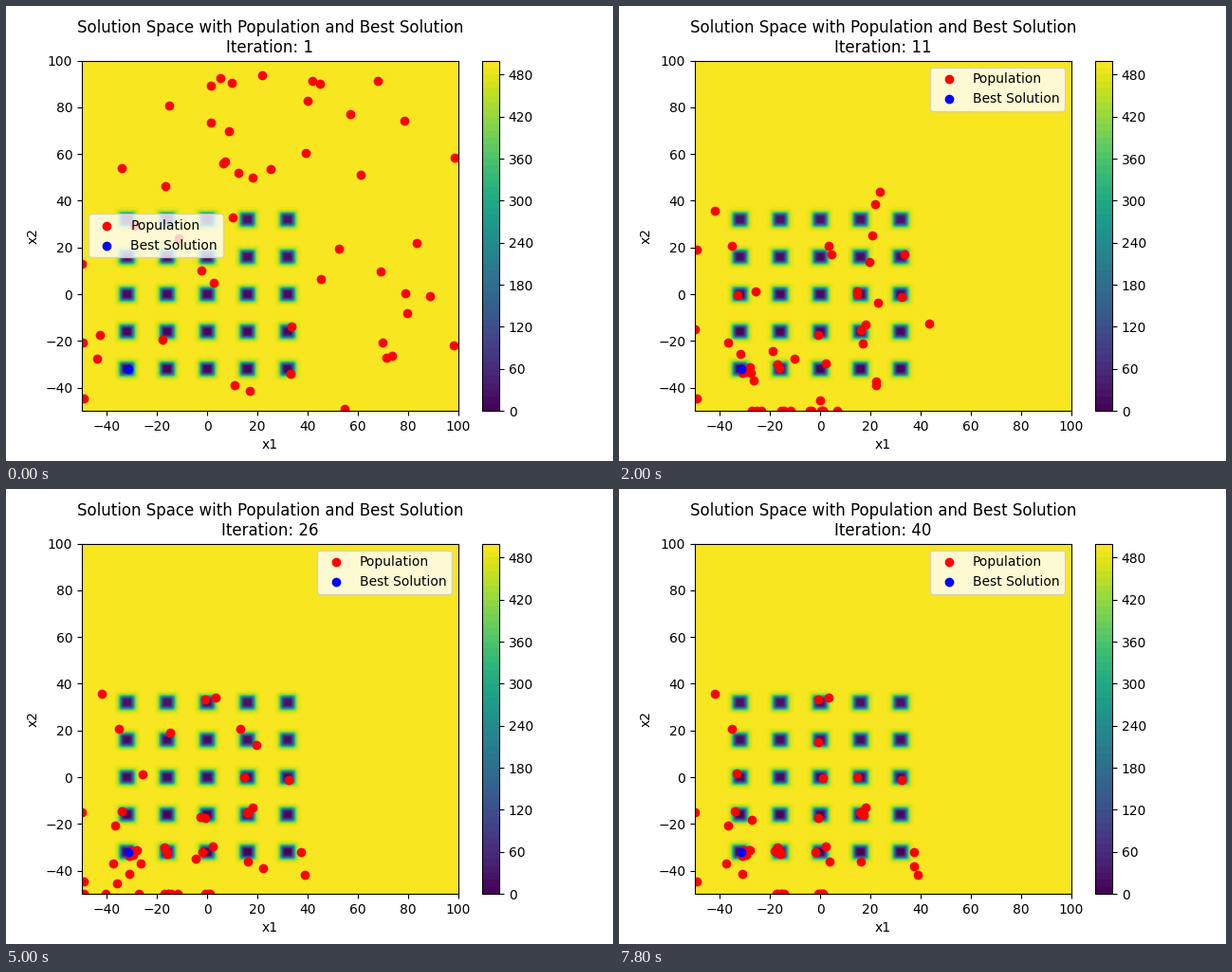
A matplotlib script that plays this animation: 640x480 px, repeating every 8000 ms.

```python
import numpy as np
import matplotlib.pyplot as plt
from matplotlib.animation import FuncAnimation

LOW, HIGH = -50, 100
SPAN = HIGH - LOW
SIZE, STEPS = 50, 40
HOP_EVERY, HOP_UNTIL = 7, 15

# Lone resting places, in order of arrival
LONERS = [
    (-49.2, -44.6), (-42.1, 35.7), (-0.9, -17.5), (14.6, 0), (-36.8, -20.7),
    (32.4, -1.2), (2.2, -29.6), (-28.1, -31.2), (-35.3, 20.7), (-50, -15),
    (-37.5, -36.9), (-0.9, 33.3), (3.3, 34.1), (-2, -32.1), (16.2, -36.1),
    (37.3, -32.1), (38.8, -41.8), (-34.1, -14.6), (-31.1, -41.4), (-0.9, 15),
    (-27.3, -18.3), (1, -0.4), (37.3, -38.1), (3.7, -36.1), (-33.4, 1.6)]
# Clusters; those below the lower bound end up lined along it
CLUSTERS = [(-30, -32), (-16, -32), (-16, -54), (1, -54), (17, -15)]


def foxholes(x, y):
    """Plateau at 500 with a 5 by 5 grid of steep holes."""
    pits = np.arange(-32, 33, 16)
    total = 0.002
    for j in range(25):
        a, b = pits[j % 5], pits[j // 5]
        total = total + 1 / (j + 1 + (x - a) ** 6 + (y - b) ** 6)
    return 1 / total


def make_homes(rng):
    """Alternate lone places with scattered cluster members."""
    homes = np.empty((SIZE, 2))
    homes[::2] = LONERS
    grouped = np.tile(CLUSTERS, (SIZE // 2 // len(CLUSTERS), 1))
    homes[1::2] = grouped + rng.normal(0, 1.2, grouped.shape)
    return np.maximum(homes, LOW)


def search(rng):
    """Positions per iteration: hop in a shrinking region, then settle."""
    homes = make_homes(rng)
    member = np.arange(SIZE)
    arrival = 1 + (STEPS - 1) * (member / (SIZE - 1)) ** 1.5
    spots = rng.uniform(LOW, HIGH, (SIZE, 2))
    history = []
    for step in range(1, STEPS + 1):
        reach = 85 + (SPAN - 85) * np.exp((1 - step) / 3)
        trial = LOW + reach * rng.uniform((0, -0.4), 1, (SIZE, 2))
        hops = (step + member) % HOP_EVERY == 0
        if 1 < step <= HOP_UNTIL:
            spots[hops] = np.maximum(trial, LOW)[hops]
        settled = arrival <= step
        spots[settled] = homes[settled]
        history.append(spots.copy())
    return history


def legend_place(step):
    if step < 3:
        return "center left"
    return "upper left" if step < 6 else "upper right"


history = search(np.random.default_rng(5))

fig, ax = plt.subplots(figsize=(6.4, 4.8), dpi=100)
axis = np.linspace(LOW, HIGH, 400)
X, Y = np.meshgrid(axis, axis)
surface = ax.contourf(X, Y, foxholes(X, Y), levels=50, cmap="viridis")
fig.colorbar(surface)
swarm = ax.scatter([], [], color="red", label="Population")
ax.scatter(-31.5, -32.1, color="blue", label="Best Solution")
ax.set(xlim=(LOW, HIGH), ylim=(LOW, HIGH), xlabel="x1", ylabel="x2")


def update(i):
    step = i + 1
    swarm.set_offsets(history[i])
    ax.legend(loc=legend_place(step))
    ax.set_title("Solution Space with Population and Best Solution\n"
                 f"Iteration: {step}")
    return swarm,


anim = FuncAnimation(fig, update, frames=STEPS, interval=200,
                     init_func=lambda: update(0), repeat=True, repeat_delay=0)
plt.show()
```
